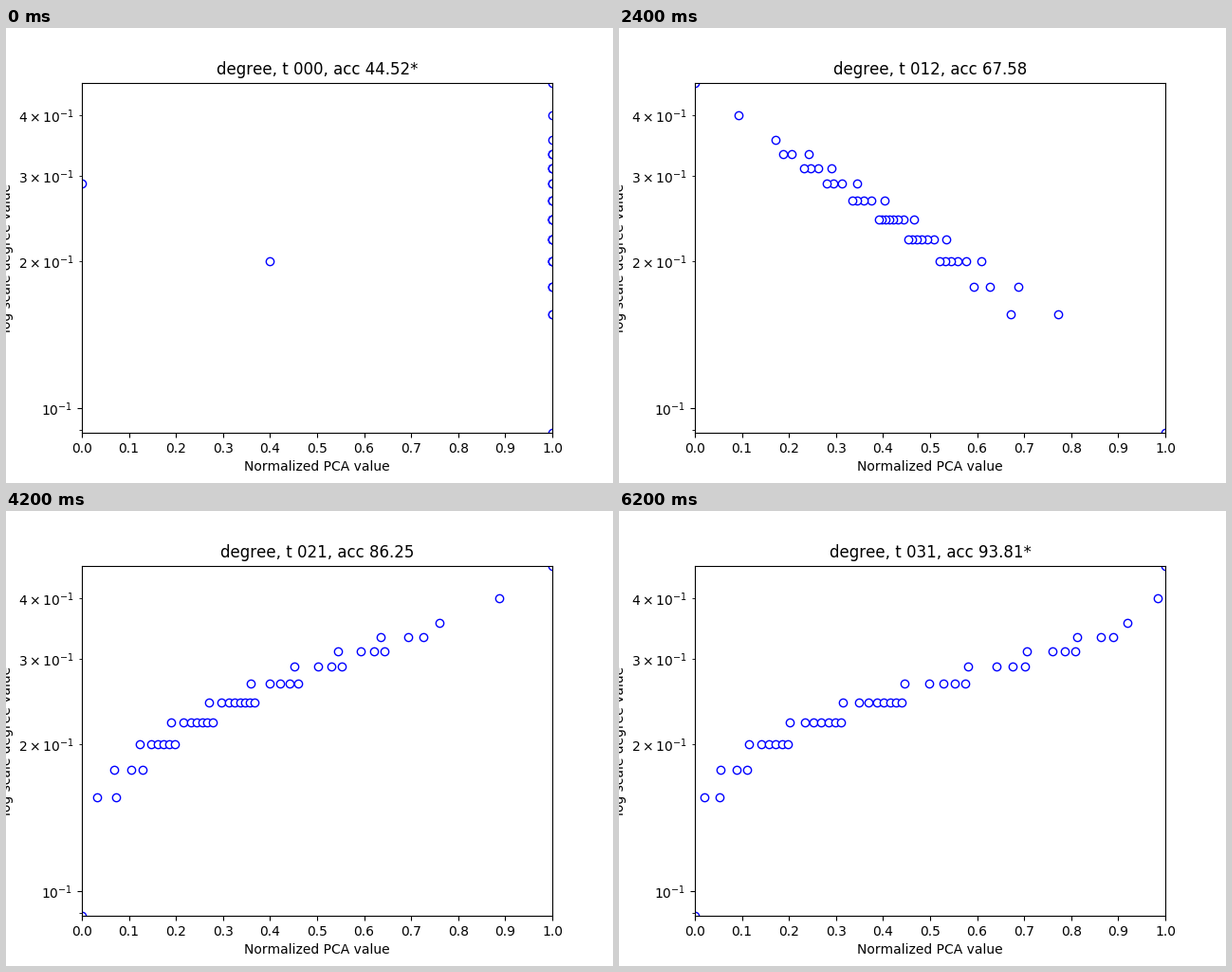
A matplotlib script for the animation above (6400 ms loop, 640 by 480 pixels).

```python
import numpy as np
import matplotlib.pyplot as plt
from matplotlib.animation import FuncAnimation

STEPS, INTERVAL = 32, 200
FLIP = 15          # the principal axis changes sign at this step
NODES = 45         # degree is normalised by this count
LOW, HIGH = 4, 21  # smallest and largest degree

# How many points share each degree from LOW to HIGH.
COUNTS = [1, 0, 0, 2, 3, 6, 7, 8, 5, 4, 4, 3, 1, 0, 1, 0, 0, 1]
degrees = np.repeat(np.arange(LOW, HIGH + 1), COUNTS)

# Best-so-far peaks and dips of the accuracy, by step.
ACCURACY = {0: 44.52, 5: 80.6, 7: 79.54, 12: 67.58, 17: 79.82,
            20: 86.9, 21: 86.25, 27: 92.1, 28: 91.78, 31: 93.81}
accuracy = np.interp(range(STEPS), list(ACCURACY), list(ACCURACY.values()))


def offsets(count):
    """Offsets in -1..1 within one degree, crowded towards the upper end."""
    if count == 1:
        return np.zeros(1)
    return 2 * np.linspace(0, 1, count) ** 0.65 - 1


jitter = np.concatenate([offsets(n) for n in COUNTS if n])


def points(step):
    """Positions on a saturating curve that bends into an S over time."""
    keys = [1, 7, 12, 21, 31]
    power = np.interp(step, keys, [0.75, 0.85, 1.03, 2.35, 3.1])
    gain = np.exp(np.interp(step, keys, [0.6, 0.5, 0.35, 1.05, 2.0]))
    spread = np.interp(step, [7, 12, 31], [0.25, 0.6, 0.48])

    reach = (degrees + spread * jitter - LOW) / (HIGH - LOW)
    xs = (1 - np.exp(-gain * reach ** power)) / (1 - np.exp(-gain))
    if step == 0:
        xs = np.ones(len(degrees))
        xs[np.argmax(degrees == 9)] = 0.4
        xs[np.argmax(degrees == 13)] = 0.0
    elif step < FLIP:
        xs = 1 - xs
    return xs, degrees / NODES


plt.rcParams["text.kerning_factor"] = 6
fig, ax = plt.subplots(figsize=(6.4, 4.8), dpi=100)
ax.set_yscale("log")
ax.set_xlim(0, 1)
ax.set_ylim(LOW / NODES, HIGH / NODES)
ax.set_xticks(np.arange(11) / 10)
ax.set_xlabel("Normalized PCA value")
ax.set_ylabel("log scale degree value")
title = ax.set_title("")
dots, = ax.plot([], [], "o", mfc="white", mec="blue")


def update(step):
    dots.set_data(*points(step))
    best = accuracy[step] > accuracy[:step].max(initial=0)
    title.set_text(f"degree, t {step:03d}, acc {accuracy[step]:.2f}"
                   + ("*" if best else ""))
    return dots, title


anim = FuncAnimation(fig, update, frames=STEPS, interval=INTERVAL,
                     repeat=True, repeat_delay=0)
plt.show()
```
